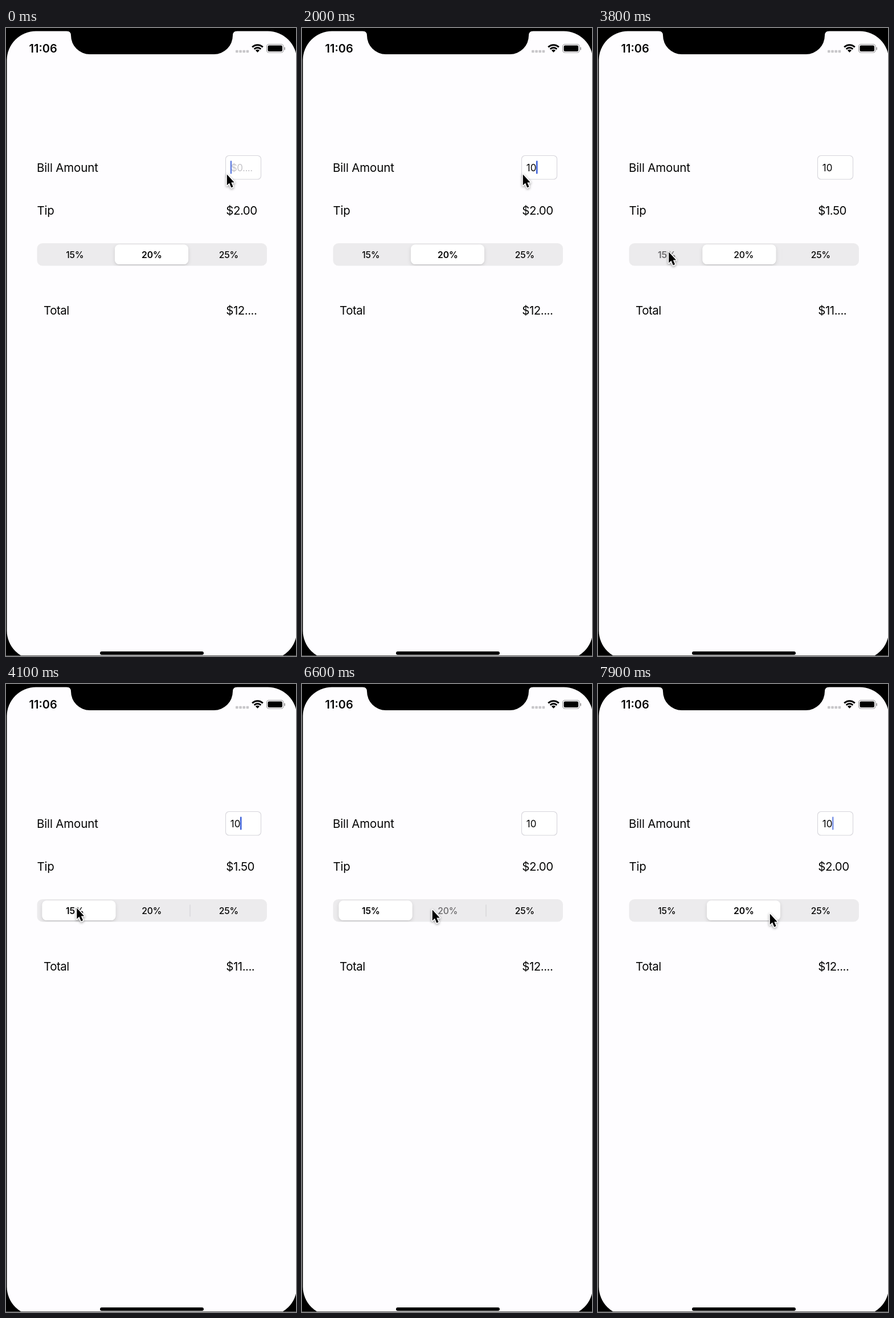
Recreate the animation shown at these times as an HTML page with a canvas. Size 509 by 1100 pixels, loop 8000 ms.

```html
<!DOCTYPE html>
<html lang="en">
<head>
<meta charset="utf-8">
<title>Tip calculator</title>
<style>
html, body { margin: 0; width: 100%; height: 100%; overflow: hidden; background: #000; }
canvas { display: block; }
</style>
</head>
<body>
<canvas id="stage" width="509" height="1100"></canvas>
<script>
const ctx = document.getElementById('stage').getContext('2d');
const LOOP = 8000, STEP = 100;
const PAPER = '#fefdff', INK = '#050505', TRACK = '#ecebed';

// Moments of the story, in ms
const TYPE_ONE = 700, TYPE_ZERO = 2000, PICK_LOW = 3700, PICK_MID = 6500;

const clamp = v => Math.max(0, Math.min(1, v));
const ease = (t, start, duration) => {
  const u = clamp((t - start) / duration);
  return u * u * (3 - 2 * u);
};
const slide = (t, start) => ease(t, start + 40, 415);

const pointerStart = { x: 387, y: 255 };
const pointerMoves = [
  { start: 2700, end: 3000, x: 127, y: 573 },
  { start: 3000, end: 3600, x: 123.5, y: 391 },
  { start: 4400, end: 4900, x: 224, y: 393 },
  { start: 5300, end: 5600, x: 228, y: 394 },
  { start: 7400, end: 7900, x: 301, y: 401 }
];

function pointerAt(t) {
  return pointerMoves.reduce((p, move) => {
    const k = ease(t, move.start, move.end - move.start);
    return { x: p.x + (move.x - p.x) * k, y: p.y + (move.y - p.y) * k };
  }, pointerStart);
}

// The caret blinks once a second, restarting at every key press.
function caretAlpha(t) {
  const restart = t >= TYPE_ZERO ? TYPE_ZERO : t >= TYPE_ONE ? TYPE_ONE : -470;
  const phase = (t - restart) % 1000;
  return Math.max(1 - clamp((phase - 440) / 150), clamp((phase - 800) / 150));
}

function text(str, x, y, { size = 20.5, weight = 400, color = INK, spacing = -0.15, align = 'left' } = {}) {
  ctx.font = `${weight} ${size}px Inter, sans-serif`;
  ctx.letterSpacing = spacing + 'px';
  ctx.textAlign = align;
  ctx.fillStyle = color;
  ctx.fillText(str, x, y);
}

function roundBox(x, y, w, h, r, fill) {
  ctx.beginPath();
  ctx.roundRect(x, y, w, h, r);
  if (fill) {
    ctx.fillStyle = fill;
    ctx.fill();
  }
}

function outline(color, width) {
  ctx.strokeStyle = color;
  ctx.lineWidth = width;
  ctx.stroke();
}

function shadow(color, blur, dy) {
  ctx.shadowColor = color;
  ctx.shadowBlur = blur;
  ctx.shadowOffsetY = dy;
}

function drawPhone() {
  ctx.fillStyle = '#000';
  ctx.fillRect(0, 0, 509, 1100);
  roundBox(1.5, 5.5, 509, 1101, 51, PAPER);

  ctx.fillStyle = '#000';
  ctx.beginPath();
  ctx.moveTo(106, 5);
  ctx.quadraticCurveTo(114, 5.5, 114, 13);
  ctx.arcTo(114, 46, 147, 46, 33);
  ctx.arcTo(398, 46, 398, 13, 33);
  ctx.quadraticCurveTo(398, 5.5, 406, 5);
  ctx.fill();

  roundBox(165, 1092, 182, 6, 3, '#000');
  ctx.fillStyle = '#555';
  ctx.fillRect(0, 1099, 509, 1);
}

function drawStatusBar() {
  text('11:06', 40.5, 43, { size: 20, weight: 600, spacing: 0 });
  for (let i = 0; i < 4; i++) roundBox(403 + i * 6.2, 38.7, 4.6, 4.6, 1, '#c8c7ca');

  const x = 441.5, y = 42.8, from = -Math.PI * 0.75, to = -Math.PI * 0.25;
  for (const r of [13.1, 8.2]) {
    ctx.beginPath();
    ctx.arc(x, y, r, from, to);
    outline('#000', 3);
  }
  ctx.beginPath();
  ctx.moveTo(x, y);
  ctx.arc(x, y, 5, from, to);
  ctx.fillStyle = '#000';
  ctx.fill();

  roundBox(457.5, 28.5, 29.5, 14.5, 4);
  outline('#99989a', 1.1);
  roundBox(459.5, 30.5, 25.5, 10.5, 2.3, '#000');
  roundBox(488.3, 33.5, 1.7, 5, 1, '#99989a');
}

function drawField(t) {
  roundBox(385.5, 223.5, 62, 41.5, 6, '#fff');
  outline('#d6d5db', 1.1);

  const typed = t >= TYPE_ZERO ? '10' : t >= TYPE_ONE ? '1' : '';
  if (typed) text(typed, 393.8, 250.5, { size: 17, spacing: 0 });
  else text('$0....', 394.8, 250.5, { size: 17, color: '#c4c3c7', spacing: -0.5 });

  ctx.globalAlpha = caretAlpha(t);
  roundBox(393.7 + 8.65 * typed.length, 232.5, 2.5, 23, 1, '#3b5fd9');
  ctx.globalAlpha = 1;
}

function drawThumb(x) {
  ctx.save();
  roundBox(54.5, 377, 403.5, 39.5, 9.5, TRACK);
  ctx.clip();
  shadow('rgba(0,0,0,.12)', 7, 2.5);
  roundBox(x, 379.5, 129, 34.5, 7.5, '#fff');
  shadow('rgba(0,0,0,.08)', 1, 1);
  ctx.fill();
  ctx.restore();
}

function drawSegments(t) {
  const position = 1 - slide(t, PICK_LOW) + slide(t, PICK_MID);
  const selected = t >= PICK_LOW + 100 && t < PICK_MID + 200 ? 0 : 1;
  const justPicked = start => t >= start && t < start + 200;
  const pressed = justPicked(PICK_LOW) ? 0 : justPicked(PICK_MID) ? 1 : -1;

  drawThumb(57 + 134 * position);

  ctx.globalAlpha = 1 - position;
  ctx.fillStyle = '#cfced2';
  ctx.fillRect(322.5, 386.5, 1, 21);
  ctx.globalAlpha = 1;

  ['15%', '20%', '25%'].forEach((label, i) => {
    text(label, 120.8 + 135 * i, 402.7, {
      size: 15.7,
      weight: i === selected ? 600 : 500,
      color: i === pressed ? '#6b6a6c' : INK,
      align: 'center'
    });
  });
}

function drawPointer({ x, y }) {
  ctx.save();
  ctx.translate(x, y);
  const arrow = new Path2D('M.8 1.5V20.5L5 16.6 8.3 24.5 11.6 23.1 8.3 15.4H13.7Z');
  ctx.strokeStyle = '#fff';
  ctx.lineWidth = 3.2;
  ctx.lineJoin = 'round';
  shadow('rgba(0,0,0,.4)', 4, 1.5);
  ctx.stroke(arrow);
  shadow('transparent', 0, 0);
  ctx.fillStyle = '#000';
  ctx.fill(arrow);
  ctx.restore();
}

function draw(t) {
  const low = t >= PICK_LOW && t < PICK_MID;
  const tight = { spacing: -0.5 };
  drawPhone();
  drawStatusBar();
  text('Bill Amount', 54, 252);
  text('Tip', 54.4, 327.3);
  text(low ? '$1.50' : '$2.00', 386.3, 326.8, tight);
  text('Total', 66, 502, tight);
  text(low ? '$11....' : '$12....', 386.3, 502, tight);
  drawField(t);
  drawSegments(t);
  drawPointer(pointerAt(t));
}

const began = performance.now();
function tick() {
  const t = (performance.now() - began) % LOOP;
  draw(Math.floor(t / STEP) * STEP);
  requestAnimationFrame(tick);
}
tick();
</script>
</body>
</html>
```
